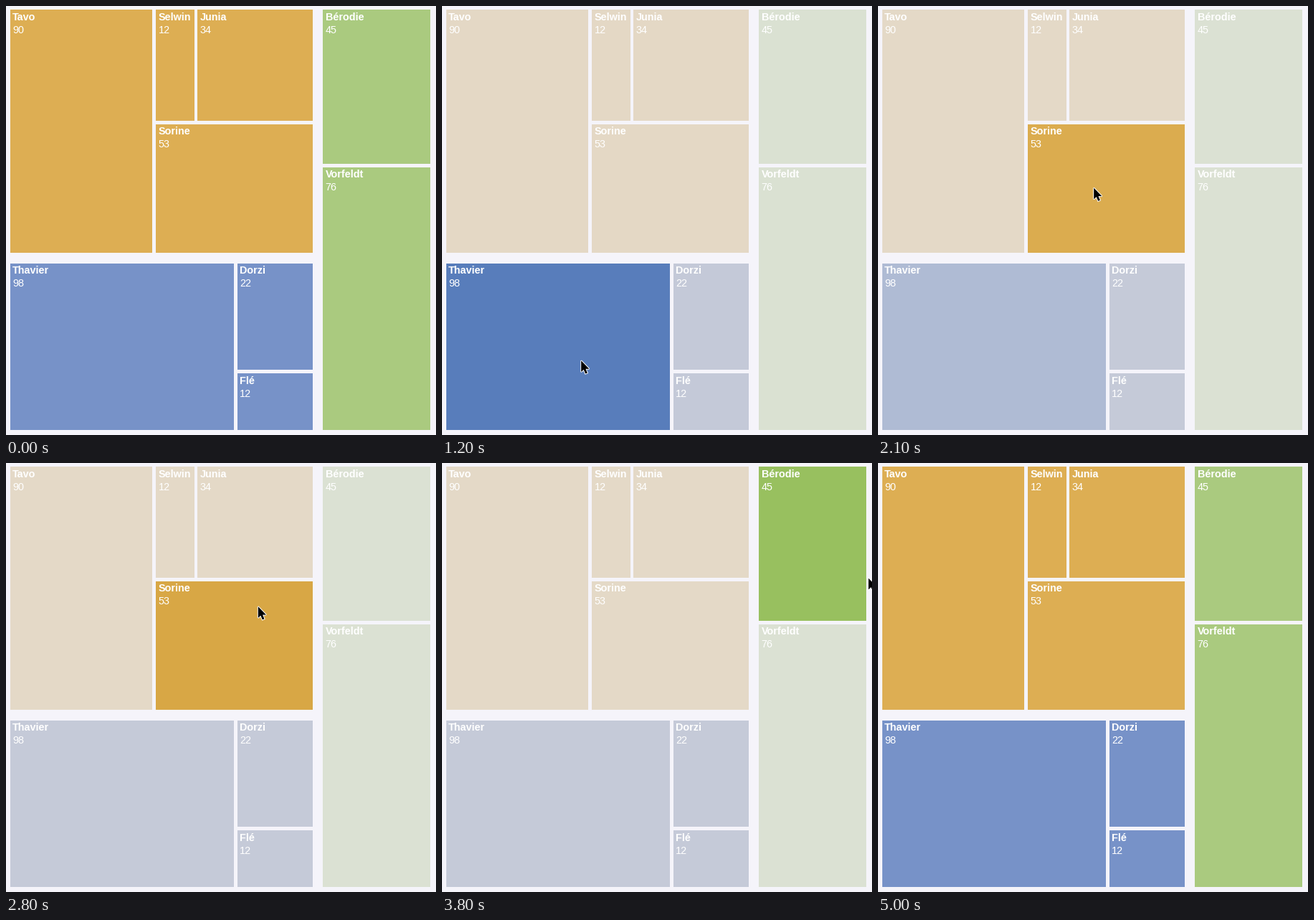
A matplotlib script that plays this animation: 600x598 px, repeating every 5400 ms.

```python
import numpy as np
import matplotlib.pyplot as plt
from matplotlib.animation import FuncAnimation
from matplotlib.colors import to_rgb
from matplotlib.patches import Polygon, Rectangle

W, H, DPI = 600, 598, 100
STEP, FRAMES = 100, 54
FADE = 300
HALF_GAP = 2.4
LEVELS = DIM, REST, FULL = 0.3, 0.8, 1.0

# colours at the dim, resting and full levels
SHADES = {
    "orange": ("#e4d9c7", "#ddae53", "#d8a745"),
    "blue": ("#c5cad8", "#7792c8", "#587dbb"),
    "green": ("#dbe1d3", "#aaca7f", "#98c05f"),
}

# nested pairs: every list is cut across its longer side
LAYOUT = [["orange", "blue"], "green"]
GROUPS = {
    "orange": [("Tavo", 90), [[("Selwin", 12), ("Junia", 34)], ("Sorine", 53)]],
    "blue": [("Thavier", 98), [("Dorzi", 22), ("Flé", 12)]],
    "green": [("Bérodie", 45), ("Vorfeldt", 76)],
}

# start of the fade, highlighted tile, level of all others
HOVERS = [
    (800, "Thavier", REST),
    (950, "Thavier", DIM),
    (1950, "Sorine", DIM),
    (2900, "Bérodie", DIM),
    (3800, None, REST),
]

# pointer moves: start, end, destination
ENTER, LEAVE = 900, 3900
ENTRY = (232, 534)
MOVES = [
    (900, 1400, (190, 490)),
    (1500, 2300, (320, 208)),
    (2700, 3100, (514, 148)),
    (3300, 3900, (600, 160)),
]
ARROW = 0.95 * np.array([
    (0, 0), (0, 16.6), (3.7, 13.2), (6.3, 19.2),
    (9.1, 18), (6.6, 12.1), (11.7, 12.1),
])

# CSS "ease" curve
s = np.linspace(0, 1, 101)
EASE_X = 0.75 * s * (1 - s) + s**3
EASE_Y = 0.3 * s * (1 - s) ** 2 + 3 * s**2 * (1 - s) + s**3


def total(node):
    if isinstance(node, str):
        return total(GROUPS[node])
    if isinstance(node, tuple):
        return node[1]
    return sum(total(child) for child in node)


def split(node, x, y, w, h):
    """Yield every leaf of the tree with its share of the rectangle."""
    if not isinstance(node, list):
        yield node, (x, y, w, h)
        return
    wide = w > h
    for child in node:
        share = total(child) / total(node)
        cw, ch = (w * share, h) if wide else (w, h * share)
        yield from split(child, x, y, cw, ch)
        x, y = (x + cw, y) if wide else (x, y + ch)


def inset(rect, d):
    x, y, w, h = rect
    return x + d, y + d, w - 2 * d, h - 2 * d


def level_of(name, t):
    level = REST
    for start, tile, others in HOVERS:
        goal = FULL if name == tile else others
        level += (goal - level) * np.interp((t - start) / FADE, EASE_X, EASE_Y)
    return level


def shade(key, level):
    rgb = np.array([to_rgb(c) for c in SHADES[key]])
    return [np.interp(level, LEVELS, channel) for channel in rgb.T]


def pointer(t):
    pos = np.array(ENTRY, float)
    for start, end, goal in MOVES:
        u = np.clip((t - start) / (end - start), 0, 1)
        # the first move is already under way when it enters
        p = 1 - (1 - u) ** 3 if start == ENTER else u * u * (3 - 2 * u)
        pos += (np.array(goal) - pos) * p
    return pos + 1.5


fig = plt.figure(figsize=(W / DPI, H / DPI), dpi=DPI, facecolor="#f5f4fa")
ax = fig.add_axes([0, 0, 1, 1])
ax.set_xlim(0, W)
ax.set_ylim(H, 0)
ax.axis("off")


def label(x, y, text, weight):
    ax.text(x, y, text, family="Liberation Sans", weight=weight,
            size=14.4 * 72 / DPI, va="baseline", color="white")


tiles = []
for key, area in split(LAYOUT, -1.4, -2.2, 600.8, 600.4):
    for (name, value), cell in split(GROUPS[key], *inset(area, 2 * HALF_GAP)):
        x, y, w, h = inset(cell, HALF_GAP)
        box = ax.add_patch(Rectangle((x, y), w, h, lw=0))
        tiles.append((name, key, box))
        label(x + 3.4, y + 14.5, name, "bold")
        label(x + 3.4, y + 32.6, str(value), "normal")

rim = ax.add_patch(Polygon(ARROW, fc="white", ec="white", lw=1.4, zorder=5))
arrow = ax.add_patch(Polygon(ARROW, fc="black", lw=0, zorder=6))


def draw(i):
    t = i * STEP
    for name, key, box in tiles:
        box.set_facecolor(shade(key, level_of(name, t)))
    for part in (rim, arrow):
        part.set_visible(ENTER <= t < LEAVE)
        part.set_xy(ARROW + pointer(t))
    return [box for _, _, box in tiles] + [rim, arrow]


anim = FuncAnimation(fig, draw, frames=FRAMES, interval=STEP,
                     repeat=True, repeat_delay=0, blit=False)
plt.show()
```
